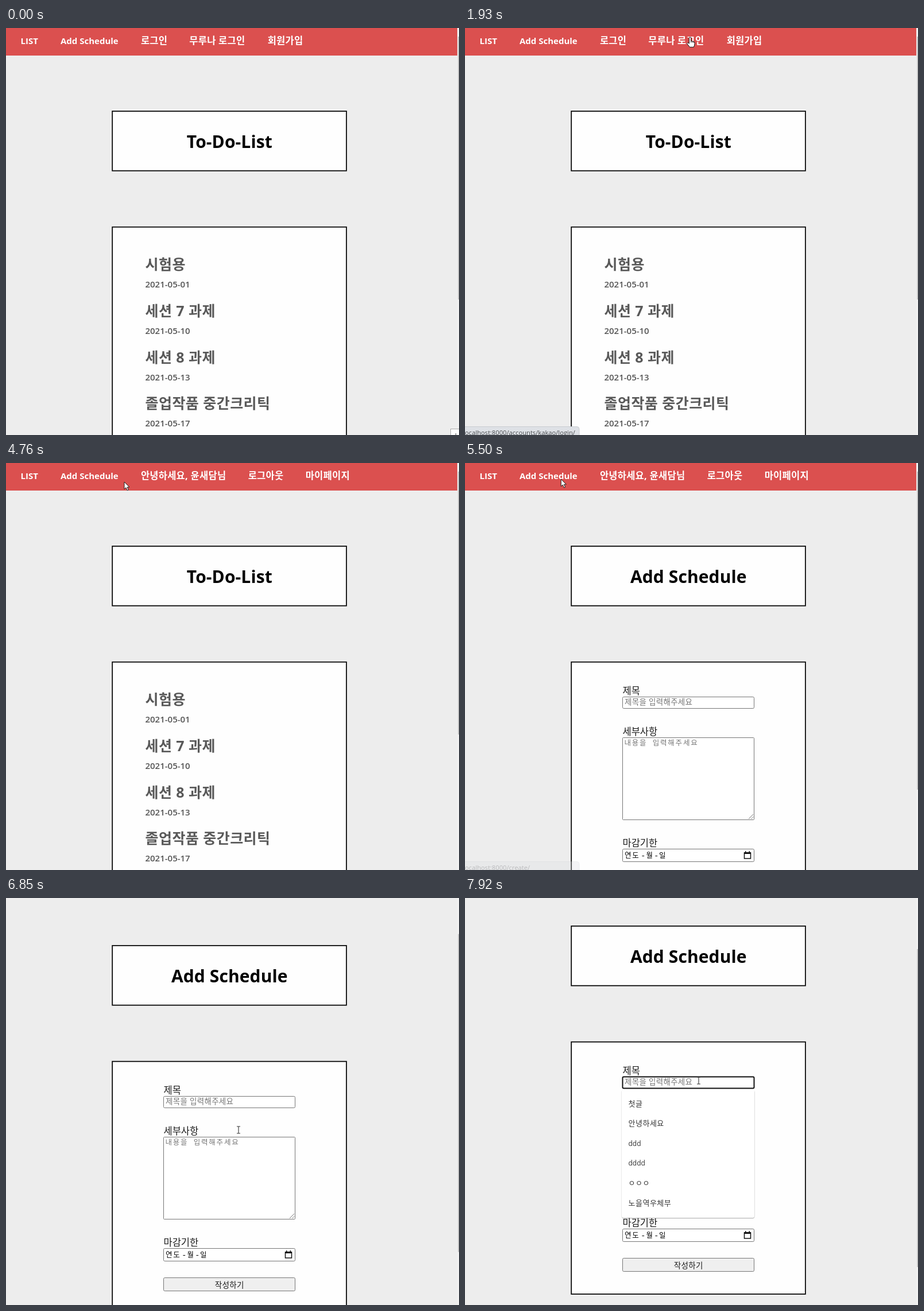
An HTML page for the animation above (8000 ms loop, 789 px wide and 709 px high).

```html
<!DOCTYPE html>
<html lang="ko">
<head>
<meta charset="utf-8">
<style>
  html, body { margin: 0; width: 100%; height: 100%; overflow: hidden; background: #ededed; }
  svg { display: block; width: 789px; height: 709px; }
  text { font-family: "Open Sans", "Noto Sans CJK KR", "Noto Sans CJK", sans-serif; white-space: pre; }
  .nav { font-size: 16.5px; font-weight: 700; letter-spacing: .25px; fill: #fff; }
  .latin { font-size: 15px; letter-spacing: 0; }
  .title { font-size: 30px; font-weight: 700; letter-spacing: .1px; text-anchor: middle; }
  .task { font-size: 25px; font-weight: 700; letter-spacing: .45px; fill: #595959; }
  .date { font-size: 15px; font-weight: 600; fill: #555; }
  .label { font-size: 16.5px; fill: #1a1a1a; }
  .field { font-size: 13.5px; letter-spacing: .3px; fill: #1a1a1a; }
  .field.hint, .hint { fill: #757575; }
  .mono { font-family: "Noto Sans Mono", "Noto Sans CJK KR", monospace; font-size: 12.5px; letter-spacing: 1.8px; }
  .mid { text-anchor: middle; }
  .item { font-size: 13px; letter-spacing: .5px; fill: #333; }
  .ascii { font-size: 12px; letter-spacing: 0; }
  .status { font-size: 11.2px; fill: #4a4d51; }
  .card { fill: #fefefe; stroke: #0a0a0a; stroke-width: 1.8; }
  .input { fill: #fff; stroke: #767676; }
</style>
</head>
<body>
<svg viewBox="0 0 789 709" xmlns="http://www.w3.org/2000/svg">
  <rect width="789" height="709" fill="#ededed"/>
  <g id="page">
    <rect width="786" height="48" fill="#db504f"/>
    <g id="navCommon"></g>
    <g id="navGuest"></g>
    <g id="navUser"></g>
    <rect class="card" x="185.2" y="144.9" width="407.7" height="103.8"/>
    <rect class="card" x="185.2" y="346.7" width="407.7" height="439.3"/>
    <g id="list"></g>
    <g id="form">
      <rect class="input" id="titleInput" x="274.5" y="407.5" width="229" height="20" rx="2"/>
      <rect class="input" x="274.5" y="478.5" width="229" height="143" rx="1"/>
      <path d="M494 620l8-8M498.500 620l3.500-3.500" stroke="#777" fill="none"/>
      <rect class="input" x="274.5" y="672.5" width="229" height="22" rx="2"/>
      <path d="M486.500 679h11v10h-11z" fill="none" stroke="#111" stroke-width="1.5"/>
      <path d="M486 678h12v3h-12zM488 676h1.500v2h-1.500zM494.500 676h1.500v2h-1.500z" fill="#111"/>
      <rect x="274.5" y="723.500" width="229" height="23" rx="2" fill="#efefef" stroke="#767676"/>
    </g>
  </g>
  <rect x="786" width="3" height="709" fill="#f1f1f1"/>
  <rect id="thumb" x="787.4" width="1.6" fill="#bdbdbd"/>
  <g id="corner">
    <rect x="774.5" y="698.5" width="20" height="16" fill="#fff" stroke="#aaa"/>
    <path d="M783.500 706v3" stroke="#555"/>
  </g>
  <g id="status">
    <rect id="bubble" x="-6" y="694.5" height="24" rx="4" fill="#dee1e6" stroke="#c9ccd1"/>
    <text class="status" id="statusText" x="-3" y="708.5"></text>
  </g>
  <rect id="caret" x="278.500" y="314" width="1" height="15"/>
  <g id="menu">
    <rect x="273" y="335" width="231.500" height="224" rx="4" opacity=".1"/>
    <rect x="272.500" y="334" width="232" height="224" rx="4" opacity=".16"/>
    <rect x="273" y="333" width="231" height="224" rx="3" fill="#fff"/>
  </g>
  <g id="cursor">
    <path id="arrow" d="M0 0V12.500L3 9.800 5.200 14.800 7.300 13.900 5.100 9H9z" fill="#fff" stroke="#111" stroke-width=".9"/>
    <g id="hand" fill="#fff" stroke="#111" stroke-linejoin="round">
      <path d="M-1.600 1.600a1.600 1.600 0 0 1 3.200 0V6.500l4.500 1.200q2 .6 2 2.600 0 4-1.800 7H-.5l-4.200-5.300q-1-1.600 .4-2.200 1.200-.4 2.700 1.300z"/>
      <path d="M1.600 6.500v3M4 7.200v2.500M6.200 7.800v2" stroke-width=".8"/>
    </g>
    <path id="beam" d="M-3-6H3M0-6V6M-3 6H3" fill="none" stroke="#333" stroke-width="1.1"/>
  </g>
</svg>
<script>
const LOOP = 8000, STEP = 70, FIRST_STEP = 410, SCROLL = 96;
const LOGIN = 2610, FORM_OPEN = 5370, FOCUS = 7400, CARET_OFF = 7920;
const $ = id => document.getElementById(id);

function addText(parent, cls, x, y, str) {
  const el = document.createElementNS("http://www.w3.org/2000/svg", "text");
  el.setAttribute("class", cls);
  el.setAttribute("x", x);
  el.setAttribute("y", y);
  el.textContent = str;
  $(parent).appendChild(el);
  return el;
}

addText("navCommon", "nav latin", 25.6, 28.3, "LIST");
addText("navCommon", "nav latin", 95, 28.3, "Add Schedule");
[[234.9, "로그인"], [319.3, "무루나 로그인"], [455.7, "회원가입"]]
  .forEach(([x, s]) => addText("navGuest", "nav", x, 28.3, s));
[[234.9, "안녕하세요, 윤새담님"], [421.7, "로그아웃"], [521.7, "마이페이지"]]
  .forEach(([x, s]) => addText("navUser", "nav", x, 28.3, s));
const title = addText("page", "title", 389.3, 209.2, "");

[["시험용", "01"], ["세션 7 과제", "10"], ["세션 8 과제", "13"], ["졸업작품 중간크리틱", "17"]]
  .forEach(([name, day], i) => {
    addText("list", "task", 242.5, 421 + i * 80.8, name);
    addText("list", "date", 242.5, 452 + i * 80.8, "2021-05-" + day);
  });

[[403, "제목"], [474, "세부사항"], [668, "마감기한"]]
  .forEach(([y, s]) => addText("form", "label", 274.5, y, s));
addText("form", "field hint", 278, 421, "제목을 입력해주세요");
addText("form", "mono hint", 277.5, 492.3, "내용을 입력해주세요");
[[278, "연도"], [306.5, "-"], [315.5, "월"], [329.5, "-"], [338, "일"]]
  .forEach(([x, s]) => addText("form", "mono", x, 687.7, s));
addText("form", "field mid", 389.3, 740.5, "작성하기");

["첫글", "안녕하세요", "ddd", "dddd", "ㅇㅇㅇ", "노을역우체부"].forEach((s, i) =>
  addText("menu", s[0] === "d" ? "item ascii" : "item", 284.5, 362.5 + i * 34.6, s));

// Pointer path: time, x, y
const path = [
  [410, 716, 566], [560, 500, 292], [720, 395, 85], [870, 379, 15],
  [1390, 379, 15], [1520, 375.5, 5], [1720, 383, 9], [1880, 392, 16],
  [3710, 392, 16], [3800, 386, 27], [4000, 317, 45], [4250, 245, 72],
  [4400, 226, 79], [4510, 222, 62], [4750, 206, 33], [4900, 190, 14],
  [5050, 168, 5], [5230, 160, 16], [5430, 160, 16], [5650, 240, 150],
  [5880, 370, 350], [6080, 402, 410], [6640, 402, 410], [6710, 403, 408],
  [6850, 405, 404], [6980, 406, 345], [7060, 407, 318]
];
const shapes = [[0, ""], [410, "arrow"], [1070, "hand"], [3740, "arrow"],
  [4860, "hand"], [5480, "arrow"], [6060, "beam"]];
const statuses = [
  { from: 1070, full: 1190, fade: LOGIN, end: LOGIN, width: 199, text: "localhost:8000/accounts/kakao/login/" },
  { from: LOGIN, full: LOGIN, fade: 2900, end: 3090, width: 259, text: "localhost의 응답을 기다리는 중..." },
  { from: 5000, full: 5120, fade: FORM_OPEN, end: 5560, width: 199, text: "localhost:8000/create/" }
];

const ramp = (t, a, b) => b > a ? Math.min(1, Math.max(0, (t - a) / (b - a))) : +(t >= a);
const smooth = p => p * p * (3 - 2 * p);
const show = (id, on) => $(id).style.display = on ? "" : "none";

function pointAt(t) {
  const next = path.findIndex(k => k[0] > t);
  if (next < 0) return path[path.length - 1].slice(1);
  if (next === 0) return path[0].slice(1);
  const a = path[next - 1], b = path[next], p = ramp(t, a[0], b[0]);
  return [a[1] + (b[1] - a[1]) * p, a[2] + (b[2] - a[2]) * p];
}

function drawStatus(t) {
  const s = statuses.find(s => t >= s.from && t < s.end);
  show("status", s);
  if (!s) return;
  $("bubble").setAttribute("width", s.width + 6);
  $("statusText").textContent = s.text;
  $("status").setAttribute("opacity", ramp(t, s.from, s.full) * (1 - ramp(t, s.fade, s.end)));
}

function draw(t) {
  const form = t >= FORM_OPEN, focused = t >= FOCUS;
  const held = FIRST_STEP + Math.floor((t - FIRST_STEP) / STEP) * STEP;
  const scroll = Math.round(SCROLL * smooth(ramp(held, 6740, 6923)));
  $("page").setAttribute("transform", `translate(0 ${-scroll})`);
  show("navGuest", t < LOGIN);
  show("navUser", t >= LOGIN);
  show("list", !form);
  show("form", form);
  title.textContent = form ? "Add Schedule" : "To-Do-List";
  $("thumb").setAttribute("y", 15 + scroll * .77);
  $("thumb").setAttribute("height", form ? 554 : 458);
  show("corner", t < 70);
  drawStatus(t);

  $("titleInput").style.cssText = focused ? "stroke:#101010;stroke-width:2" : "";
  show("caret", focused && t < CARET_OFF);
  $("menu").setAttribute("opacity", ramp(t, FOCUS, 7520));

  const shape = shapes.filter(s => s[0] <= t).pop()[1];
  ["arrow", "hand", "beam"].forEach(id => show(id, id === shape));
  $("cursor").setAttribute("transform", `translate(${pointAt(held)})`);
}

const start = performance.now();
function tick() {
  draw((performance.now() - start) % LOOP);
  requestAnimationFrame(tick);
}
tick();
</script>
</body>
</html>
```
